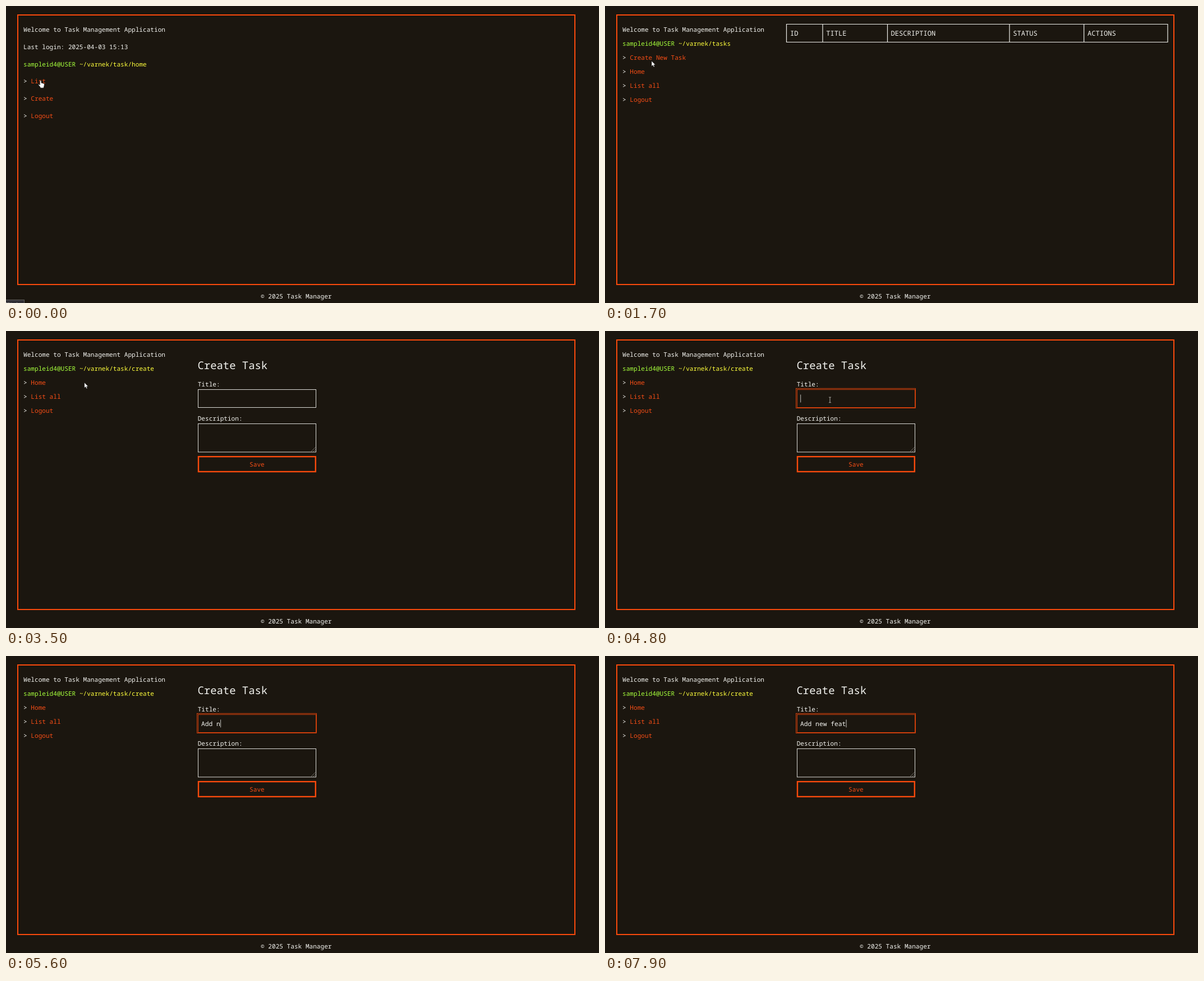
Animation, 1057 px wide and 530 px high, one loop 8 s. Source, as an HTML page:

```html
<!DOCTYPE html>
<html lang="en">
<head>
<meta charset="utf-8">
<title>Task Manager</title>
<style>
  html, body { margin: 0; width: 100%; height: 100%; overflow: hidden; background: #1b160f; }
  svg { display: block; width: 1057px; height: 530px; fill: none; }
  text { font: 500 11.1px "Noto Sans Mono", monospace; fill: #f4f4f0; text-rendering: geometricPrecision; white-space: pre; }
  .user { fill: #a6ff3c; }
  .path { fill: #ffff3c; }
  .link { fill: #f54d16; }
  .head { font-size: 12.1px; }
  .big { font-size: 18.9px; font-weight: 400; }
  .input { font-size: 11.3px; }
  .small { font: 6.55px "Open Sans", sans-serif; }
  .line { stroke: #eeeeea; }
  .accent { stroke: #fa4a0c; }
  .pointer { fill: #fff; stroke: #111; stroke-width: .6; }
</style>
</head>
<body>
<svg id="stage" viewBox="0 0 1057 530">
  <rect class="accent" x="21" y="16" width="993" height="481" stroke-width="2"/>
  <text x="31" y="46">Welcome to Task Management Application</text>
  <text x="454" y="522">© 2025 Task Manager</text>

  <g id="home"></g>

  <g id="list">
    <path class="line" stroke-width="1.2" d="M323.5 32.5H1003V64.5H323.5ZM388 32.5V64.5M503.5 32.5V64.5M721 32.5V64.5M853.7 32.5V64.5"/>
  </g>

  <g id="create">
    <text class="big" x="341.5" y="68">Create Task</text>
    <text x="341.7" y="99">Title:</text>
    <rect id="field" x="342.5" y="104.5" width="210" height="32"/>
    <rect id="ring" class="accent" x="340.5" y="102.5" width="213" height="35" stroke-width=".8"/>
    <text id="typed" class="input" x="348" y="125"></text>
    <path id="caret" class="line" stroke-width=".8"/>
    <text x="341.7" y="159.5">Description:</text>
    <rect class="line" x="342.5" y="165.5" width="210" height="50.5" stroke-width=".9"/>
    <path d="M544 215L551.5 207.5M548 215L551.5 211.5" stroke="#99958c" stroke-width=".7"/>
    <rect class="accent" x="343" y="224.2" width="208.8" height="26.8" stroke-width="2.4"/>
    <text class="link" x="447.4" y="242" text-anchor="middle">Save</text>
    <g id="popup">
      <rect x="342.5" y="136.5" width="210" height="48" fill="#2b2a33" stroke="#5b5a62" stroke-width=".9"/>
    </g>
  </g>

  <g id="status">
    <rect id="panel" x="-2" y="524.5" height="12" fill="#2f2e34" stroke="#62615f"/>
    <text id="hint" class="small" x="-8" y="534">8080/tasks</text>
  </g>

  <g id="pointer">
    <path id="arrow" class="pointer" d="M0 0V9.6L2.2 7.6L3.8 11L5.4 10.3L3.9 7H6.8Z"/>
    <path id="hand" class="pointer" d="M-1.2 .6Q0 -1 1.2 .6V4L4.8 4.9Q6.8 5.3 6.7 7L6 10.4L5.3 13H-.2L-1 11L-3.9 7.6Q-3.6 5.8 -2.1 6.9L-1.2 7.8Z"/>
    <path id="beam" d="M-2 -4.5H-.6L0 -4L.6 -4.5H2M0 -4V4.6M-2 5H-.6L0 4.6L.6 5H2" stroke="#d8d6d0" stroke-width=".8"/>
  </g>
</svg>
<script>
const LOOP = 8000, STEP = 100;
const OPEN_LIST = 500, HOVER = 2100, OPEN_CREATE = 3300, FOCUS = 4600;
const $ = id => document.getElementById(id);

function addText(group, x, y, markup, cls = "") {
  group.insertAdjacentHTML("beforeend", `<text class="${cls}" x="${x}" y="${y}">${markup}</text>`);
}

function addMenu(group, gap, path, links) {
  addText(group, 31, 46 + gap, `<tspan class="user">sampleid4@USER</tspan> <tspan class="path">~/varnek/${path}</tspan>`);
  links.forEach((name, i) =>
    addText(group, 31, 46 + gap * (i + 2), `&gt; <tspan class="link">${name}</tspan>`));
}

addText($("home"), 31, 77, "Last login: 2025-04-03 15:13");
const homeLines = document.createElementNS("http://www.w3.org/2000/svg", "g");
homeLines.setAttribute("transform", "translate(0 30.8)");
$("home").append(homeLines);
addMenu(homeLines, 30.8, "task/home", ["List", "Create", "Logout"]);
addMenu($("list"), 25, "tasks", ["Create New Task", "Home", "List all", "Logout"]);
addMenu($("create"), 25, "task/create", ["Home", "List all", "Logout"]);
[["ID", 330], ["TITLE", 394.3], ["DESCRIPTION", 509.5], ["STATUS", 727.3], ["ACTIONS", 860]]
  .forEach(([name, x]) => addText($("list"), x, 53, name, "head"));
["a", "asd", "aaaaaaaaaaa", "ab"].forEach((s, i) => addText($("popup"), 345, 146 + 12 * i, s, "small"));

// time, x, y of the pointer's hot spot
const moves = [
  [0, 61.7, 133.2], [1000, 61.7, 133.2], [1700, 83, 98], [1900, 83, 98],
  [2500, 139.7, 92], [3500, 139.7, 92], [4400, 401, 122.7], [LOOP, 401, 122.7]
];
const keys = [
  [FOCUS, ""], [5100, "A"], [5300, "Ad"], [5400, "Add"], [5500, "Add "], [5600, "Add n"],
  [5700, "Add ne"], [5800, "Add new"], [5900, "Add new F"], [6700, "Add new "],
  [6900, "Add new f"], [7100, "Add new fe"], [7300, "Add new fea"], [7600, "Add new feat"]
];

function pointerAt(t) {
  const i = moves.findIndex(m => m[0] > t);
  const [t0, x0, y0] = moves[i - 1], [t1, x1, y1] = moves[i];
  const u = (t - t0) / (t1 - t0), k = u * u * (3 - 2 * u);
  return [x0 + (x1 - x0) * k, y0 + (y1 - y0) * k];
}

function show(id, on) { $(id).style.display = on ? "" : "none"; }

function draw(t) {
  const onHome = t < OPEN_LIST, onCreate = t >= OPEN_CREATE, focused = t >= FOCUS;
  show("home", onHome);
  show("list", !onHome && !onCreate);
  show("create", onCreate);

  const hover = onHome || (t >= HOVER && !onCreate);
  show("status", hover);
  show("hint", onHome);
  $("panel").setAttribute("width", onHome ? 34.5 : 122);

  const [x, y] = pointerAt(t);
  const overField = onCreate && x > 342;
  $("pointer").setAttribute("transform", `translate(${x} ${y})`);
  show("pointer", t < 5100);
  show("hand", hover);
  show("beam", overField);
  show("arrow", !hover && !overField);

  const [since, typed] = keys.findLast(k => k[0] <= t) || [0, ""];
  const end = 348.7 + typed.length * 6.78;
  $("typed").textContent = typed;
  $("caret").setAttribute("d", `M${end} 113.5V127.5`);
  show("caret", focused && (t - since) % 1000 < 500);
  show("ring", focused);
  $("field").setAttribute("class", focused ? "accent" : "line");
  $("field").setAttribute("stroke-width", focused ? .8 : .9);
  show("popup", t >= 5200 && t < 5400);
}

const start = performance.now();
function tick() {
  const t = (performance.now() - start) % LOOP;
  draw(Math.floor(t / STEP) * STEP);
  requestAnimationFrame(tick);
}
tick();
</script>
</body>
</html>
```
